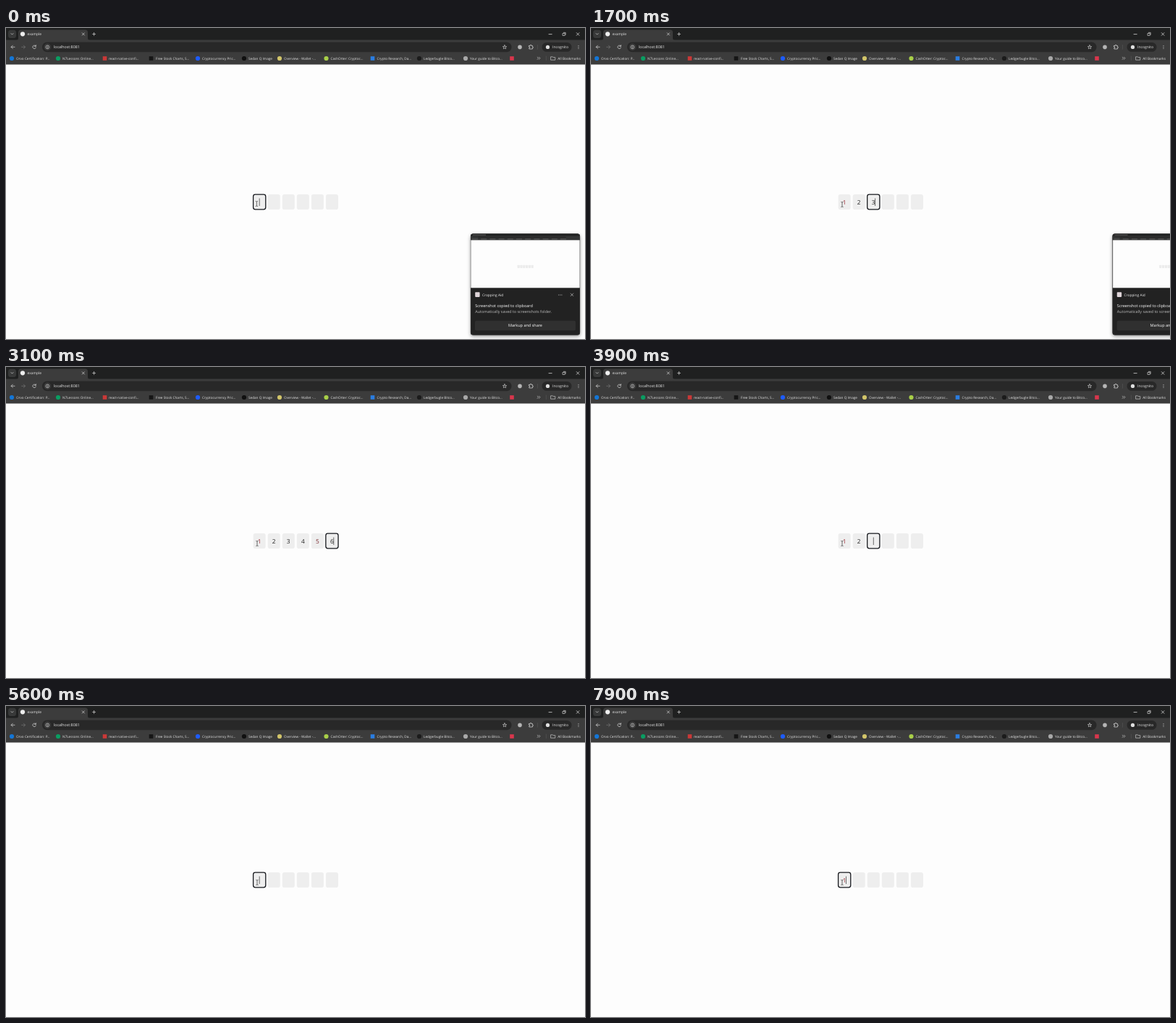
Write an HTML page that moves like this. It is 800 px wide and 430 px high and loops after 8 s.

```html
<!DOCTYPE html>
<html lang="en">
<head>
<title>Code input</title>
<style>
  html, body { margin: 0; width: 100%; height: 100%; overflow: hidden; background: #fdfdfd; }
  svg { display: block; width: 800px; height: 430px; }
  text { font-family: "Open Sans", "Noto Sans", sans-serif; text-rendering: geometricPrecision; }
</style>
</head>
<body>
<svg id="stage" viewBox="0 0 800 430">
  <defs>
    <clipPath id="card"><rect x="642" y="284.5" width="151" height="140" rx="3.5"/></clipPath>
    <filter id="shade" x="-20%" y="-20%" width="140%" height="140%">
      <feDropShadow dx="0" dy="2" stdDeviation="2.5" flood-opacity=".4"/>
    </filter>
  </defs>
  <rect width="800" height="430" fill="#fdfdfd"/>
  <g id="browser"></g>
  <g id="cells"></g>
  <rect id="focus" y="230.1" width="17.2" height="20.8" rx="2.8" fill="none" stroke="#15171c" stroke-width="1.3"/>
  <path id="caret" stroke="#333" stroke-width=".7" fill="none"/>
  <path id="mouse" d="M-1.6-3.5Q0-3.5 0-2.6Q0-3.5 1.6-3.5M0-2.6V2.6M-1.6 3.5Q0 3.5 0 2.6Q0 3.5 1.6 3.5" fill="none" stroke="#333" stroke-width=".7"/>
  <g id="toast"></g>
</svg>
<script>
const LOOP = 8000;
const NS = "http://www.w3.org/2000/svg";
const byId = id => document.getElementById(id);

function add(parent, tag, attrs, content) {
  const el = document.createElementNS(NS, tag);
  for (const key in attrs) el.setAttribute(key, attrs[key]);
  if (content !== undefined) el.textContent = content;
  parent.appendChild(el);
  return el;
}
const box = (p, x, y, width, height, fill, rx = 0) => add(p, "rect", { x, y, width, height, fill, rx });
const dot = (p, cx, cy, r, fill) => add(p, "circle", { cx, cy, r, fill });
const line = (p, d, stroke = "#ddd", width = .7) =>
  add(p, "path", { d, stroke, "stroke-width": width, fill: "none", "stroke-linecap": "round", "stroke-linejoin": "round" });
const label = (p, x, y, size, fill, content, anchor = "start") =>
  add(p, "text", { x, y, "font-size": size, fill, "text-anchor": anchor }, content);

function drawTabs(g) {
  box(g, 0, 0, 800, 17.5, "#1f2020");
  box(g, 0, 16.5, 800, 34, "#3c3c3c");
  box(g, 3, 2.8, 11, 11.2, "#383939", 3.5);
  line(g, "M7 7.6L8.5 9.1L10 7.6");
  add(g, "path", { d: "M13.5 17Q17 17 17 14V6Q17 2.5 20.5 2.5H109.5Q113 2.5 113 6V14Q113 17 116.5 17Z", fill: "#3c3c3c" });
  dot(g, 23, 8.3, 3.1, "#eeeeee");
  label(g, 29.5, 10.2, 4.9, "#e3e3e3", "example");
  line(g, "M105.2 6.8L108.4 10M108.4 6.8L105.2 10");
  line(g, "M119.6 8.4H123.6M121.6 6.4V10.4");
  line(g, "M750 8.6H754.2", "#eee");
  line(g, "M769.4 7.4H772.2V10.4H769.4ZM770.4 6.3H773.2V9.3", "#eee", .6);
  line(g, "M788.3 6.6L792 10.3M792 6.6L788.3 10.3", "#eee");
}

function drawToolbar(g) {
  line(g, "M12 26.3H7.2M9.3 24.1L7.1 26.3L9.3 28.5");
  line(g, "M21.6 26.3H26.4M24.3 24.1L26.5 26.3L24.3 28.5", "#777");
  line(g, "M41 24.9A2.3 2.3 0 1 0 41.4 27M41.3 23.6V25.3H39.6");
  box(g, 50, 19.6, 648.5, 13.6, "#282828", 6.8);
  dot(g, 57.3, 26.4, 4.8, "#3c3c3c");
  add(g, "circle", { cx: 57.3, cy: 26.4, r: 2.3, fill: "none", stroke: "#ddd", "stroke-width": .6 });
  line(g, "M57.3 26.3V27.6M57.3 25.2V25.3", "#ddd", .6);
  label(g, 65.8, 28.4, 5.35, "#e8e8e8", "localhost:8081");

  let star = "M";
  for (let i = 0; i < 10; i++) {
    const r = i % 2 ? 1.2 : 2.8, a = Math.PI * (i / 5 - .5);
    star += `${689 + r * Math.cos(a)} ${26.5 + r * Math.sin(a)}L`;
  }
  line(g, star.slice(0, -1) + "Z", "#ddd", .6);
  dot(g, 710, 26.4, 2.8, "#b5b5b5");
  line(g, "M722.8 24.5H724.2V23.6H726V24.5H727.4V26H728.2V27.5H727.4V29H722.8V27.5H723.6V26H722.8Z", "#ddd", .7);
  line(g, "M734.3 23.5V29.3", "#5c5c5c", .6);
  box(g, 740.5, 20, 41, 12.8, "#282828", 6.4);
  dot(g, 748.5, 26.4, 2.6, "#dedede");
  label(g, 755, 28.2, 5.05, "#e8e8e8", "Incognito");
  for (const y of [24.6, 26.4, 28.2]) dot(g, 791, y, .5, "#ddd");
}

function drawBookmarks(g) {
  const marks = [
    [8, 14, "#1476d6", "Orvo Certification: P..."],
    [72, 78, "#0a9d62", "N7Lessons Online..."],
    [136.5, 142, "#cb3837", "react-native-confi...", true],
    [200.5, 207, "#151515", "Free Stock Charts, S...", true],
    [265, 271, "#1d5cff", "Cryptocurrency Pric..."],
    [329, 335, "#101010", "Sedan Q Image"],
    [378, 384, "#d2c56a", "Overview - Wallet -..."],
    [442.5, 448.5, "#a8cf48", "CashOtter: Cryptoc..."],
    [506.5, 512.5, "#2a7de1", "Crypto Research, Da...", true],
    [571, 577, "#1b1b1b", "Ledgerbugle Bitco..."],
    [635, 641, "#a9a9a9", "Your guide to Bitco..."],
    [699, 705, "#d9364c", "", true]
  ];
  for (const [ix, tx, color, title, square] of marks) {
    if (square) box(g, ix - 2.8, 39.2, 5.6, 5.6, color);
    else dot(g, ix, 42, 3.1, color);
    label(g, tx, 43.7, 4.68, "#e3e3e3", title);
  }
  line(g, "M734.2 40.2L735.7 41.8L734.2 43.4M736.5 40.2L738 41.8L736.5 43.4", "#ddd", .6);
  line(g, "M746.3 39V44.8", "#5c5c5c", .6);
  line(g, "M753 39.8H755.2L756 40.6H758.8V44.2H753Z", "#ddd", .6);
  label(g, 762.3, 43.7, 4.78, "#e3e3e3", "All Bookmarks");
}

function drawToast(g) {
  add(g, "rect", { x: 642, y: 284.5, width: 151, height: 140, rx: 3.5, fill: "#202020", filter: "url(#shade)" });
  const body = add(g, "g", { "clip-path": "url(#card)" });
  box(body, 642, 284.5, 151, 140, "#222222");
  box(body, 642, 284.5, 151, 9, "#343535");
  box(body, 642, 284.5, 151, 3, "#202121");
  box(body, 645, 285.5, 18, 1.2, "#555");
  box(body, 652, 288.5, 122, 2, "#292929", 1);
  for (let i = 0; i < 11; i++) box(body, 644 + i * 12.2, 291.6, 8, .6, "#777");
  box(body, 642, 293.3, 151, 66, "#fdfdfd");
  for (let i = 0; i < 6; i++) box(body, 706.6 + i * 3.8, 327.7, 3.2, 4.2, "#ececec", .6);
  box(body, 648.2, 365.3, 6.4, 6.6, "#dfd5d9", .8);
  label(body, 658, 370.7, 4.85, "#f0f0f0", "Cropping Aid");
  for (const x of [763.7, 765.8, 767.9]) dot(body, x, 369, .5, "#ddd");
  line(body, "M780.2 367L783.8 370.6M783.8 367L780.2 370.6", "#ddd", .6);
  label(body, 648.3, 386.3, 5.52, "#fff", "Screenshot copied to clipboard");
  label(body, 648.3, 394.3, 5.4, "#bdbdbd", "Automatically saved to screenshots folder.");
  box(body, 648, 404.7, 139, 13.6, "#303030", 2);
  label(body, 717.5, 413.4, 5.5, "#fff", "Markup and share", "middle");
  add(g, "rect", { x: 642.2, y: 284.7, width: 150.6, height: 139.6, rx: 3.4, fill: "none", stroke: "#3b3b3b", "stroke-width": .5 });
}

const browser = byId("browser");
drawTabs(browser);
drawToolbar(browser);
drawBookmarks(browser);
drawToast(byId("toast"));

const inkFor = { 1: "#9c2b35", 5: "#7a2b30" };
const digits = Array.from({ length: 6 }, (_, i) => {
  const x = 341.7 + i * 20.05;
  box(byId("cells"), x, 230, 17, 21, "#eeeeee", 2.8);
  return label(byId("cells"), x + 8.4, 243.9, 8.3, "#222", "", "middle");
});

// Each edit: time, digits present, focused cell
const edits = [
  [0, "", 0], [1000, "1", 0], [1300, "12", 1], [1600, "123", 2], [1900, "1234", 3],
  [2200, "12345", 4], [2500, "123456", 5], [3200, "12345", 5], [3400, "1234", 4],
  [3600, "123", 3], [3800, "12", 2], [4100, "1", 1], [4400, "", 0],
  [6200, "2", 0], [7100, "", 0], [7600, "1", 0]
];

const slide = t => {
  const p = Math.min(1, Math.max(0, (t - 1500) / 300));
  return 175 * p * p;
};

function draw(t) {
  const [, code, at] = edits.filter(e => e[0] <= t).pop();
  digits.forEach((el, i) => {
    const digit = code[i] || "";
    if (el.textContent !== digit) el.textContent = digit;
    el.setAttribute("fill", inkFor[digit] || "#222");
  });
  const x = 341.6 + at * 20.05;
  byId("focus").setAttribute("x", x);
  byId("caret").setAttribute("d", `M${x + (code[at] ? 10.9 : 8.6)} 235.5V246`);
  byId("mouse").setAttribute("transform", t < 400 ? "translate(346.4 243)" : "translate(347 244)");
  const toast = byId("toast"), shift = slide(t);
  toast.setAttribute("transform", `translate(${shift} 0)`);
  toast.setAttribute("visibility", shift < 175 ? "visible" : "hidden");
}

const start = performance.now();
function tick() {
  draw((performance.now() - start) % LOOP);
  requestAnimationFrame(tick);
}
tick();
</script>
</body>
</html>
```
